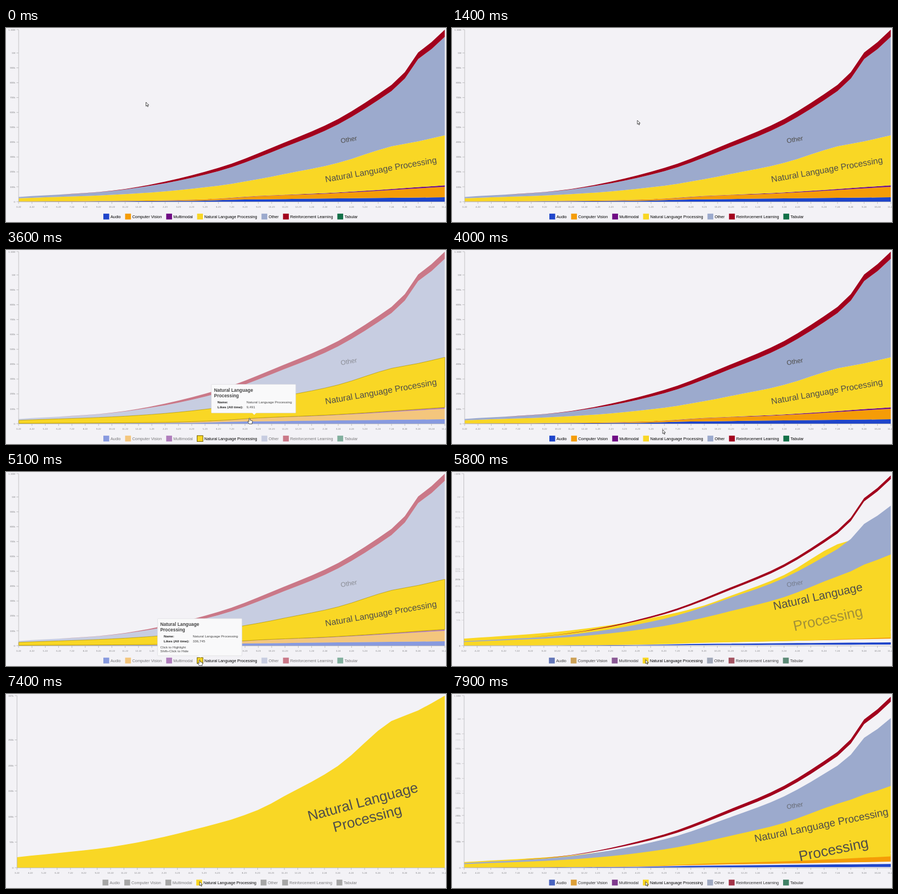
An HTML page for the animation above (8000 ms loop, 800 by 353 pixels).

```html
<!DOCTYPE html>
<html lang="en">
<head>
<meta charset="utf-8">
<title>Likes by category</title>
<style>
  html, body { margin: 0; width: 100%; height: 100%; overflow: hidden; background: #f3f2f6; }
  svg { display: block; width: 100vw; height: 100vh; font-family: "Liberation Sans", Arial, sans-serif; }
  .axis line { stroke: #b4b4b6; stroke-width: .8; }
  .axis text { font-size: 4.4px; fill: #808084; }
  .legend text { font-size: 7.3px; fill: #000; }
  .label { fill: #4f4d49; text-anchor: middle; }
  .tip { font-size: 6.25px; fill: #444; }
  .tip .box { fill: #f9f9fa; stroke: #dcdce0; stroke-width: .7; }
  .tip .title { font-size: 8.4px; font-weight: bold; }
  .tip .key { font-weight: bold; fill: #222; }
</style>
</head>
<body>
<svg id="stage" viewBox="0 0 800 353" preserveAspectRatio="none"></svg>
<script>
const LOOP = 8000, ZOOM_IN = 5500, ZOOM_OUT = 7557, ZOOM_TIME = 600;
const TOP = 3, BASE = 316, RIGHT = 797.8, N = 33;
const svg = document.getElementById('stage');

const clamp = v => Math.max(0, Math.min(1, v));
const lerp = (a, b, p) => a + (b - a) * p;
const cubic = x => x < .5 ? 4 * x ** 3 : 1 - 4 * (1 - x) ** 3;
const ramp = (t, start, time) => clamp((t - start) / time);
const monthly = f => Array.from({ length: N }, (_, i) => f(i));

function add(parent, tag, attrs = {}, text) {
  const node = document.createElementNS('http://www.w3.org/2000/svg', tag);
  set(node, attrs);
  if (text !== undefined) node.textContent = text;
  parent.appendChild(node);
  return node;
}
function set(node, attrs) {
  for (const key in attrs) node.setAttribute(key, attrs[key]);
}

// Smooth curve through a few [month, value] points, sampled at every month.
function curve(...points) {
  const last = points.length - 1;
  const slope = k => {
    const a = points[Math.max(0, k - 1)], b = points[Math.min(last, k + 1)];
    return (b[1] - a[1]) / (b[0] - a[0]);
  };
  return monthly(i => {
    const k = Math.max(1, points.findIndex(q => q[0] >= i));
    const [a, b] = [points[k - 1], points[k]];
    const h = b[0] - a[0], u = (i - a[0]) / h, mean = (b[1] - a[1]) / h;
    return lerp(a[1], b[1], u)
      + h * u * (1 - u) * ((1 - u) * (slope(k - 1) - mean) - u * (slope(k) - mean));
  });
}

// Upper edges of the layers, in stage pixels.
const floor = monthly(() => BASE);
const soloTop = curve([0, 297], [8, 274.6], [15, 235.6], [18, 211.3], [20, 185.8],
  [24, 131], [27, 67], [28, 49.2], [30, 30], [32, TOP]);
const totalTop = curve([0, 307.4], [8, 292.9], [15, 254.5], [20, 208], [24, 165.4],
  [28, 103.4], [29, 80.3], [30, 44.4], [31, 25.8], [32, TOP]);
const redDepth = curve([0, 0], [8, .8], [15, 6], [32, 13]);
const audioTop = curve([0, 315.8], [13, 314.4], [17, 312.1], [32, 308]);
const multiTop = curve([0, 315.4], [11, 313.6], [15, 310.3], [18, 305.6], [24, 299.2], [32, 286.3]);
const visionTop = multiTop.map((y, i) => y + 2.6 * (i / 32) ** 3);
const nlpTop = multiTop.map((y, i) => y - .2912 * (BASE - soloTop[i]));
const otherTop = totalTop.map((y, i) => y + redDepth[i]);

const layer = (name, color, top, bottom) => ({ name, color, top, bottom });
const chosen = layer('Natural Language Processing', [249, 215, 37], nlpTop, multiTop);
const series = [
  layer('Audio', [31, 69, 202], audioTop, floor),
  layer('Computer Vision', [245, 156, 7], visionTop, audioTop),
  layer('Multimodal', [111, 11, 132], multiTop, visionTop),
  chosen,
  layer('Other', [156, 170, 205], otherTop, nlpTop),
  layer('Reinforcement Learning', [162, 0, 29], totalTop, otherTop),
  layer('Tabular', [18, 112, 72], totalTop, totalTop)
];
const rgb = c => `rgb(${c.map(Math.round)})`;

// Areas
for (const s of series) s.path = add(svg, 'path', { fill: rgb(s.color) });

// Axes
const axis = add(svg, 'g', { class: 'axis' });
const yLine = add(axis, 'line', { y1: TOP, y2: BASE + .4 });
const xLine = add(axis, 'line', { x2: RIGHT, y1: BASE + .4, y2: BASE + .4 });
const months = monthly(i => {
  const m = i + 2, g = add(axis, 'g');
  add(g, 'line', { y1: BASE, y2: BASE + 4 });
  add(g, 'text', { y: 326.6, 'text-anchor': 'middle' }, `${m % 12 + 1}-${22 + Math.floor(m / 12)}`);
  return g;
});
const yTicks = [];
function yTick(text, full, solo) {
  const g = add(axis, 'g');
  add(g, 'line', { x1: -4, x2: 0 });
  add(g, 'text', { x: -6.3, y: 1.6, 'text-anchor': 'end' }, text);
  yTicks.push({ g, full, solo });
}
const fullY = k => BASE - .2706 * k, soloY = k => BASE - .93 * k;
yTick('0', BASE, BASE);
for (let k = 100; k <= 1000; k += 100) {
  yTick(k < 1000 ? k + 'k' : '1M', fullY(k), k <= 200 ? soloY(k) : null);
}
for (let k = 50; k <= 250; k += 100) yTick(k + 'k', null, soloY(k));
yTick('1.16M', TOP, null);
yTick('337k', null, TOP);

// Area labels
const otherLabel = add(svg, 'text', { class: 'label', 'font-size': 12, transform: 'translate(624 206.8) rotate(-10)' }, 'Other');
const line1 = add(svg, 'text', { class: 'label' });
const line2 = add(svg, 'text', { class: 'label', 'font-size': 26 }, 'Processing');

// Legend, each entry following the width of the one before
const legend = add(svg, 'g', { class: 'legend' });
let legendX = 177;
for (const s of series) {
  s.swatch = add(legend, 'rect', { x: legendX, y: 337.8, width: 10.6, height: 10.6 });
  s.text = add(legend, 'text', { x: legendX + 13, y: 345.6 }, s.name);
  legendX += s.text.getComputedTextLength() + 20.9;
}

// Tooltips
function tooltip(x, y, height, likes, hints) {
  const g = add(svg, 'g', { class: 'tip', transform: `translate(${x} ${y})` });
  add(g, 'rect', { class: 'box', width: 153.5, height, rx: 1 });
  add(g, 'path', { d: `M74 ${height - .4}h8l-4 4z`, fill: '#f9f9fa' });
  ['Natural Language', 'Processing'].forEach((line, i) =>
    add(g, 'text', { class: 'title', x: 5, y: 13 + 10 * i }, line));
  [['Name:', chosen.name], ['Likes (All time):', likes]].forEach(([key, value], i) => {
    add(g, 'text', { class: 'key', x: 11.3, y: 34.6 + 9 * i }, key);
    add(g, 'text', { x: 64, y: 34.6 + 9 * i }, value);
  });
  hints.forEach((hint, i) => add(g, 'text', { x: 5, y: 54.2 + 7 * i }, hint));
  return g;
}
const areaTip = tooltip(373.3, 244.5, 52, '9,491', []);
const legendTip = tooltip(275.5, 266.8, 67.5, '336,745', ['Click to Highlight', 'Shift+Click to Hide']);

// Pointer
const ink = { fill: '#fff', stroke: '#222', 'stroke-width': .8, 'stroke-linejoin': 'round' };
const arrow = add(svg, 'path', { ...ink, d: 'M0 0V7.2L1.7 5.7L2.9 8.3L4.1 7.8L2.9 5.2H5.2Z' });
const hand = add(svg, 'path', { ...ink, d: 'M-1 1Q0-.6 1 1V4L5 5Q5.6 5.3 5.3 7L4.5 10.8H-.5L-3.3 7Q-3.6 5.6-2.2 6L-1 7Z' });

// Each move: start, duration, target
const home = [254.5, 135];
const moves = [
  [350, 1000, [337, 168]],
  [1500, 550, [451.5, 302.5]],
  [3500, 450, [383, 327]],
  [4050, 350, [352, 341.5]]
];
function pointerAt(t) {
  return moves.reduce((at, [start, time, to]) => {
    const p = ramp(t, start, time), e = p * p * (3 - 2 * p);
    return at.map((v, i) => lerp(v, to[i], e));
  }, home);
}

function areaPath(top, bottom, xs) {
  const point = (y, i) => `${xs[i].toFixed(2)} ${y.toFixed(2)}`;
  return `M${top.map(point).join('L')}L${bottom.map(point).reverse().join('L')}Z`;
}

function draw(t) {
  const solo = t < ZOOM_OUT
    ? cubic(ramp(t, ZOOM_IN, ZOOM_TIME))
    : 1 - cubic(ramp(t, ZOOM_OUT, ZOOM_TIME));
  const onArea = ramp(t, 1950, 100) - ramp(t, 3750, 100);
  const onLegend = ramp(t, 4400, 100) - ramp(t, ZOOM_IN, 100);
  const hover = onArea + onLegend;
  const dim = 1 - .5 * hover;

  const x0 = lerp(23, 20, solo);
  const xs = monthly(i => lerp(x0, RIGHT, i / (N - 1)));

  for (const s of series) {
    // The chosen layer moves to the floor; the others shrink to their middle line.
    const own = s === chosen;
    const top = s.top.map((y, i) => lerp(y, own ? soloTop[i] : (y + s.bottom[i]) / 2, solo));
    const bottom = s.bottom.map((y, i) => lerp(y, own ? BASE : (y + s.top[i]) / 2, solo));
    const opacity = own ? 1 : dim, gray = own ? 0 : solo;
    set(s.path, { d: areaPath(top, bottom, xs), opacity, display: gray > .999 ? 'none' : 'inline' });
    set(s.swatch, { fill: rgb(s.color.map(c => lerp(c, 166, gray))), opacity });
    set(s.text, { opacity: Math.min(opacity, 1 - .5 * gray) });
  }
  set(chosen.path, { stroke: '#c3a400', 'stroke-opacity': hover });
  set(chosen.swatch, { stroke: '#6d5c00', 'stroke-opacity': hover });
  set(legend, { transform: `translate(${-1.5 * solo} 0)` });

  set(yLine, { x1: x0, x2: x0 });
  set(xLine, { x1: x0 });
  months.forEach((g, i) => set(g, { transform: `translate(${xs[i]} 0)` }));
  for (const { g, full, solo: alone } of yTicks) {
    const y = lerp(full ?? alone, alone ?? full, solo);
    const opacity = full === null ? solo : alone === null ? 1 - solo : 1;
    set(g, { transform: `translate(${x0} ${y})`, opacity });
  }

  const turn = lerp(-10, -15, solo), zoomed = t >= ZOOM_IN && t < ZOOM_OUT;
  line1.textContent = zoomed ? 'Natural Language' : chosen.name;
  set(line1, {
    'font-size': lerp(15.6, 26, solo),
    transform: `translate(${lerp(682.5, 651, solo)} ${lerp(262.8, 204.5, solo)}) rotate(${turn})`
  });
  set(line2, {
    opacity: t < ZOOM_IN ? 0 : zoomed ? solo : 1,
    transform: `translate(${lerp(712, 659, solo)} ${lerp(317, 234.8, solo)}) rotate(${turn})`
  });
  set(otherLabel, { opacity: (1 - solo) * dim });

  set(areaTip, { opacity: onArea });
  set(legendTip, { opacity: onLegend });
  const transform = `translate(${pointerAt(t).join(' ')})`;
  set(arrow, { transform, opacity: hover > .5 ? 0 : 1 });
  set(hand, { transform, opacity: hover > .5 ? 1 : 0 });
}

const start = performance.now();
function tick() {
  draw((performance.now() - start) % LOOP);
  requestAnimationFrame(tick);
}
tick();
</script>
</body>
</html>
```
